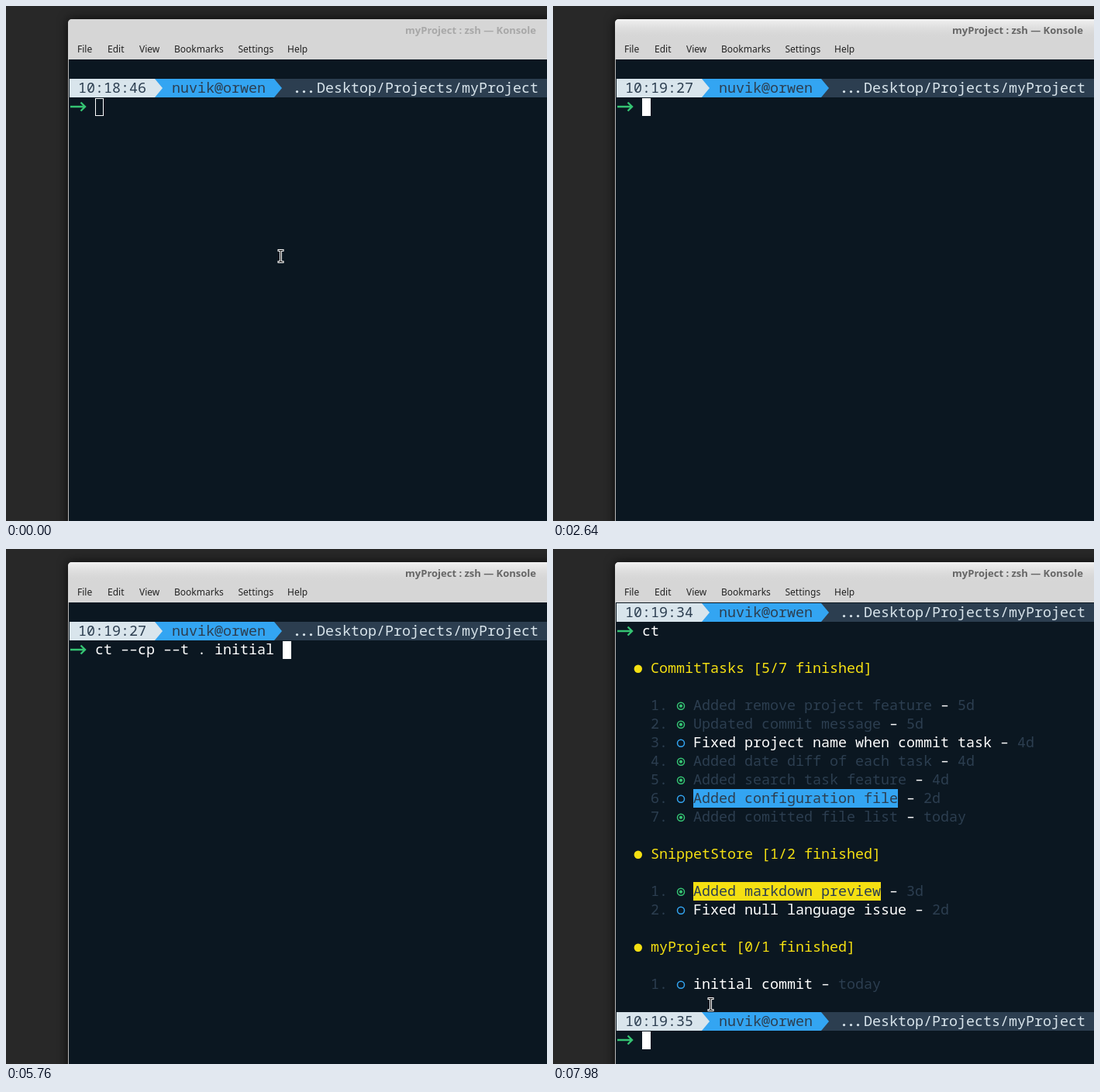
Recreate the animation shown at these times as an HTML page with a canvas. Size 698x665 px, loop 8 s.

```html
<!DOCTYPE html>
<html lang="en">
<head>
<meta charset="utf-8">
<title>Terminal session</title>
<style>
  html, body { margin: 0; width: 100%; height: 100%; overflow: hidden; background: #282828; }
  canvas { display: block; }
</style>
</head>
<body>
<canvas id="stage" width="698" height="665"></canvas>
<script>
const ctx = document.getElementById('stage').getContext('2d');
const W = 698, H = 665, LOOP = 8000;
const CELL_W = 11, CELL_H = 24, LEFT = 82, TOP = 70;
const MONO = '18.333px "Noto Sans Mono", "DejaVu Sans Mono", monospace';
const SANS = '"Noto Sans", "Open Sans", sans-serif';
const C = {
  desk: '#282828', bar: '#d6d6d6', term: '#0b1721', white: '#ffffff', slate: '#2c3e50',
  pale: '#d9e5ec', blue: '#33a5f2', green: '#35c473', yellow: '#f5e012'
};

const colX = col => LEFT + col * CELL_W;
const rowY = row => TOP + row * CELL_H;

// Last entry of [time, value] pairs that has started.
const latest = (steps, t) => steps.filter(([start]) => t >= start).pop()[1];

function rect(x, y, w, h, color) {
  ctx.fillStyle = color;
  ctx.fillRect(x, y, w, h);
}

function text(str, col, row, color) {
  ctx.font = MONO;
  ctx.textAlign = 'left';
  ctx.fillStyle = color;
  ctx.fillText(str.replace(/-/g, '–'), colX(col), rowY(row) + 18);
}

function dot(x, y, r, color) {
  ctx.fillStyle = color;
  ctx.beginPath();
  ctx.arc(x, y, r, 0, 7);
  ctx.fill();
}

function ring(col, row, color, filled) {
  const x = colX(col) + 6, y = rowY(row) + 12.7;
  ctx.strokeStyle = color;
  ctx.lineWidth = 1.5;
  ctx.beginPath();
  ctx.arc(x, y, 4.5, 0, 7);
  ctx.stroke();
  if (filled) dot(x, y, 2.1, color);
}

function cursor(col, row, hollow) {
  const x = colX(col), y = rowY(row) + 1;
  if (!hollow) return rect(x, y, CELL_W, 23, C.white);
  ctx.strokeStyle = C.white;
  ctx.lineWidth = 1;
  ctx.strokeRect(x + .5, y + .5, CELL_W - 1, 22);
}

function segment(from, to, row, color) {
  const x1 = colX(from), x2 = colX(to), y = rowY(row);
  ctx.fillStyle = color;
  ctx.beginPath();
  ctx.moveTo(x1, y);
  ctx.lineTo(x2, y);
  ctx.lineTo(x2 + 10, y + 12);
  ctx.lineTo(x2, y + 24);
  ctx.lineTo(x1, y + 24);
  ctx.fill();
}

function prompt(row, clock, input, active, hollow) {
  rect(LEFT, rowY(row), W - LEFT, CELL_H, C.slate);
  segment(10, 24, row, C.blue);
  segment(0, 10, row, C.pale);
  text(clock, 1, row, C.slate);
  text('nuvik@orwen', 12, row, C.slate);
  for (const x of [375.5, 384.5, 393.5]) dot(x, rowY(row) + 16.6, 1.6, C.pale);
  text('Desktop/Projects/myProject', 29, row, C.pale);

  const y = rowY(row + 1) + 12;
  ctx.strokeStyle = C.green;
  ctx.lineWidth = 2.4;
  ctx.beginPath();
  ctx.moveTo(83, y);
  ctx.lineTo(102, y);
  ctx.moveTo(96.5, y - 5.5);
  ctx.lineTo(102, y);
  ctx.lineTo(96.5, y + 5.5);
  ctx.stroke();
  text(input, 3, row + 1, C.white);
  if (active) cursor(3 + input.length, row + 1, hollow);
}

// Task entries: label, age, state ('done' or 'open'), optional highlight.
const PROJECTS = [
  ['CommitTasks [5/7 finished]', [
    ['Added remove project feature', '5d', 'done'],
    ['Updated commit message', '5d', 'done'],
    ['Fixed project name when commit task', '4d', 'open'],
    ['Added date diff of each task', '4d', 'done'],
    ['Added search task feature', '4d', 'done'],
    ['Added configuration file', '2d', 'open', C.blue],
    ['Added comitted file list', 'today', 'done']
  ]],
  ['SnippetStore [1/2 finished]', [
    ['Added markdown preview', '3d', 'done', C.yellow],
    ['Fixed null language issue', '2d', 'open']
  ]],
  ['myProject [0/1 finished]', [
    ['initial commit', 'today', 'open']
  ]]
];

function taskList(row, count) {
  for (const [title, tasks] of PROJECTS.slice(0, count)) {
    dot(colX(2) + 5.8, rowY(row) + 12.7, 5.2, C.yellow);
    text(title, 4, row, C.yellow);
    row += 2;
    tasks.forEach(([label, age, state, highlight], i) => {
      const done = state === 'done', end = 9 + label.length;
      text(`${i + 1}.`, 4, row, C.slate);
      ring(7, row, done ? C.green : C.blue, done);
      if (highlight) rect(colX(9), rowY(row), label.length * CELL_W, CELL_H, highlight);
      text(label, 9, row, done || highlight ? C.slate : C.white);
      text('-', end + 1, row, C.white);
      text(age, end + 3, row, C.slate);
      row++;
    });
    row++;
  }
}

function windowFrame(focus) {
  rect(0, 0, W, H, C.desk);
  ctx.save();
  ctx.shadowColor = 'rgba(0,0,0,.75)';
  ctx.shadowBlur = 14;
  ctx.fillStyle = '#b9b9b9';
  ctx.beginPath();
  ctx.roundRect(80, 17, 700, 760, 5);
  ctx.fill();
  ctx.restore();

  ctx.save();
  ctx.beginPath();
  ctx.roundRect(80, 17, 700, 52, [5, 0, 0, 0]);
  ctx.clip();
  rect(80, 17, W, 52, C.bar);
  const shine = ctx.createLinearGradient(0, 17, 0, 43);
  shine.addColorStop(0, `rgba(242,242,242,${focus})`);
  shine.addColorStop(1, 'rgba(214,214,214,0)');
  rect(80, 17, W, 26, shine);
  ctx.restore();
  rect(81, 69, W, H, C.term);

  const grey = Math.round(168 - 66 * focus);
  ctx.font = 'bold 13px ' + SANS;
  ctx.textAlign = 'right';
  ctx.fillStyle = `rgb(${grey},${grey},${grey})`;
  ctx.fillText('myProject : zsh — Konsole', 684, 36);
  ctx.font = '12px ' + SANS;
  ctx.textAlign = 'left';
  ctx.fillStyle = '#232323';
  const menu = { File: 92, Edit: 131, View: 172, Bookmarks: 217, Settings: 299.5, Help: 363 };
  for (const name in menu) ctx.fillText(name, menu[name], 60);
}

function pointer(x, y) {
  ctx.lineCap = 'square';
  for (const [width, color] of [[3, C.white], [1, '#111']]) {
    ctx.strokeStyle = color;
    ctx.lineWidth = width;
    ctx.beginPath();
    ctx.moveTo(x - 2, y - 7.5);
    ctx.lineTo(x + 3, y - 7.5);
    ctx.moveTo(x + .5, y - 7.5);
    ctx.lineTo(x + .5, y + 7.5);
    ctx.moveTo(x - 2, y + 7.5);
    ctx.lineTo(x + 3, y + 7.5);
    ctx.stroke();
  }
  ctx.lineCap = 'butt';
}

const LIST = [[0, ''], [960, 'c'], [1080, 'ct']];
const CLEAR = [[0, ''], [1740, 'c'], [1860, 'cl'], [1920, 'cle'], [2040, 'clea'], [2100, 'clear']];
const CREATE = [
  [0, ''], [2700, 'c'], [2760, 'ct'], [2820, 'ct '], [3060, 'ct -'], [3120, 'ct --'],
  [3300, 'ct --c'], [3360, 'ct --cp'], [3480, 'ct --cp -'],
  [3720, 'ct --cp --'], [3780, 'ct --cp --t'], [3840, 'ct --cp --t '],
  [4680, 'ct --cp --t .'], [4740, 'ct --cp --t . '],
  ...[5100, 5220, 5280, 5400, 5460, 5580, 5640, 5760].map(
    (time, i) => [time, 'ct --cp --t . ' + 'initial '.slice(0, i + 1)]),
  [5940, 'ct --cp --t . initial c'], [6060, 'ct --cp --t . initial com'],
  [6120, 'ct --cp --t . initial comm'], [6240, 'ct --cp --t . initial commit']
];
const LIST_AGAIN = [[0, ''], [6780, 'c'], [6960, 'ct']];

function firstListing(t) {
  prompt(1, '10:18:46', latest(LIST, t), t < 1200, t < 60);
  if (t < 1200) return;
  if (t < 1260) return cursor(0, 3);
  taskList(4, 2);
  if (t < 1320) return cursor(0, 18);
  prompt(19, '10:19:25', latest(CLEAR, t), true);
}

function createTask(t) {
  if (t < 2520) return cursor(0, 0);
  prompt(1, '10:19:27', latest(CREATE, t), t < 6420);
  if (t < 6420) return;
  if (t < 6480) return cursor(0, 3);
  ring(2, 3, C.green, true);
  text('Created task initial commit', 4, 3, C.green);
  if (t < 6540) return cursor(0, 4);
  prompt(5, '10:19:34', latest(LIST_AGAIN, t), t < 7200);
  if (t >= 7200) cursor(0, 7);
}

function secondListing() {
  prompt(0, '10:19:34', 'ct', false);
  taskList(3, 3);
  prompt(22, '10:19:35', '', true);
}

function draw(t) {
  windowFrame(t < 60 ? 0 : t < 120 ? .5 : 1);
  if (t < 2460) firstListing(t);
  else if (t < 7320) createTask(t);
  else secondListing();

  if (t < 960) pointer(354, 323);
  if (t >= 7800) {
    const k = Math.min(3, Math.floor((t - 7800) / 60)) / 3;
    pointer(Math.round(235 - 32 * k), Math.round(415 + 173 * k));
  }
}

function tick(now) {
  draw(now % LOOP);
  requestAnimationFrame(tick);
}
requestAnimationFrame(tick);
</script>
</body>
</html>
```
